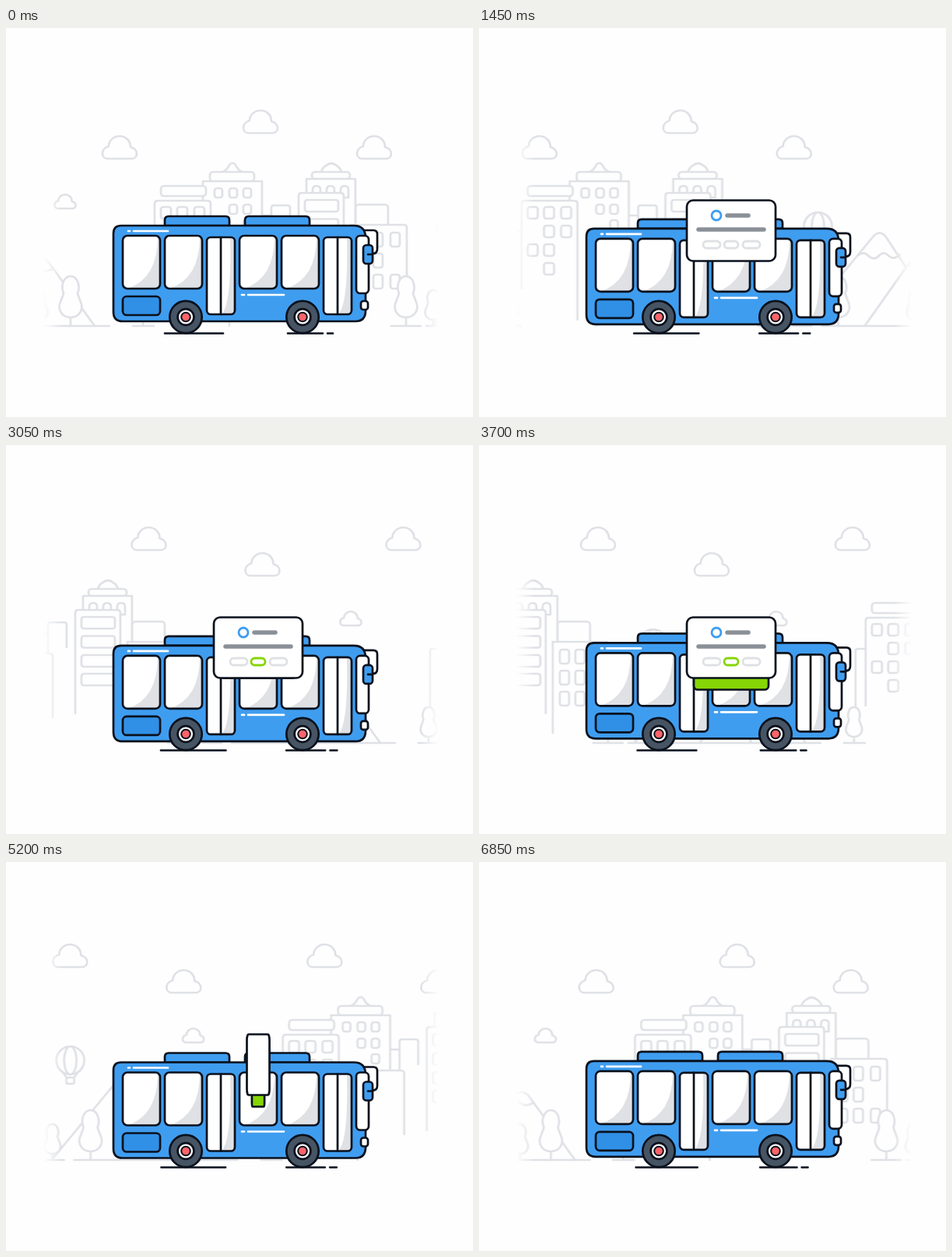
These frames come from a looping animation (600 by 500 pixels, 6900 ms). An HTML page:

```html
<!DOCTYPE html>
<html>
<head>
<meta charset="utf-8">
<style>
html, body { margin: 0; width: 100%; height: 100%; overflow: hidden; background: #fefefe; }
svg { display: block; width: 600px; height: 500px; stroke-linecap: round; stroke-linejoin: round; }
.far { fill: #fefefe; stroke: #dfe1e6; stroke-width: 2.7; }
.ink { stroke: #0a111c; stroke-width: 2.7; }
.ink rect, .ink path { vector-effect: non-scaling-stroke; }
</style>
</head>
<body>
<svg id="stage" viewBox="0 0 600 500"></svg>
<script>
const LOOP = 6900, SPAN = 654, SPEED = 0.0941, BOB = 534.6;
const BLUE = '#3f9df0', WHITE = '#fff', SHADE = '#dfe1e5', MID = 324;

const rect = (x, y, x2, y2, r = 4, fill, extra = '') =>
  `<rect x="${x}" y="${y}" width="${x2 - x}" height="${y2 - y}" rx="${r}" ${fill ? `fill="${fill}"` : ''} ${extra}/>`;
const path = (d, extra = '') => `<path d="${d}" ${extra}/>`;
const open = d => path(d, 'fill="none"');
const at = (x, y, s, body) => `<g transform="translate(${x} ${y}) scale(${s})">${body}</g>`;
const panes = (xs, y, w, h) => xs.map(x => rect(x, y, x + w, y + h, 3)).join('');
const thin = s => `vector-effect="non-scaling-stroke" data-s="${s}"`;

const cloud = (x, y, s = 1) => at(x, y, s, path(
  'M-15 29H15C24 29 25 17 14 14C14 5 7 0 0 0C-8 0 -14 6 -14 13C-25 16 -24 29 -15 29Z', thin(s)));
const tree = (x, s = 1) => at(x, 383, s, path(
  'M0 -11C-12 -11 -17 -22 -13 -31C-11 -36 -10 -38 -9 -42C-13 -51 -9 -64 0 -64C9 -64 13 -51 9 -42' +
  'C10 -38 11 -36 13 -31C17 -22 12 -11 0 -11V0', thin(s)));

const mountains =
  path('M548 383L643 268Q651 259 659 268L735 383', 'stroke-dasharray="500"') +
  open('M624 292Q631 286 637 293Q644 300 651 292Q657 286 663 293Q670 299 677 291') +
  path('M632 383L690 301Q699 291 708 300L768 383') +
  open('M684 309Q691 301 697 309Q704 316 715 309');

const balloon =
  '<ellipse cx="572" cy="255" rx="18" ry="18"/><ellipse cx="572" cy="255" rx="8" ry="18"/>' +
  open('M563 271L567 277M581 271L577 277') + rect(567, 277, 577, 285, 2);

const city =
  rect(449, 227, 491, 260) +
  open('M341 241H329M341 268V231Q341 228 344 228H362Q365 228 365 231V260') +
  // domed tower
  path('M278 185Q284 183 287 176Q291 171 295 176Q298 183 304 185') + rect(262, 185, 319, 197) +
  path('M253 345V197H329V270') +
  panes([268, 287, 305], 206, 10, 12) + panes([287, 305], 227, 10, 12) + panes([305], 247, 10, 12) +
  // low block with a sign
  open('M178 335V265Q178 262 181 262H191') +
  rect(199, 203, 257, 216) + path('M191 335V226Q191 222 195 222H259Q263 222 263 226V375') +
  panes([199, 220, 242], 230, 13, 15) + panes([220, 242], 254, 13, 15) +
  panes([199, 220], 278, 13, 15) + panes([220], 302, 13, 15) +
  path('M287 350V272Q287 268 291 268H343Q347 268 347 272V350') +
  // office block
  path('M443 253H511Q515 253 515 257V335') +
  panes([452, 472, 494], 263, 12, 18) + panes([452, 472], 290, 12, 18) + panes([452, 472, 494], 317, 12, 18) +
  // striped tower
  path('M405 185Q407 179 411 177Q418 171 425 177Q429 179 431 185') + rect(393, 185, 442, 194) +
  path('M386 212V194H449V253') + open('M443 253V370') +
  [394, 412, 430].map(x => path(`M${x} 218V208Q${x} 203 ${x + 5} 203T${x + 10} 208V218Z`)).join('') +
  path('M376 345V216Q376 212 380 212H430Q434 212 434 216V345') +
  [221, 245.5, 270, 294].map(y => rect(384, y, 427, y + 15, 3)).join('');

const land = mountains + city + balloon +
  tree(43, .72) + tree(83) + tree(176, .72) + tree(287, .72) + tree(514) + tree(549, .72) + tree(598) + tree(697, .72) +
  open('M43 383H133M163 383H190M495 383H533M540 383H564M577 383H697') + cloud(76, 214, .62);

const repeat = (body, step, from, to) => {
  let out = '';
  for (let i = from; i <= to; i++) out += `<g transform="translate(${i * step})">${body}</g>`;
  return out;
};

const glass = x => rect(x, 267, x + 48, 335, 6, WHITE, 'stroke="none"') +
  path(`M${x + 45} 268Q${x + 45} 322 ${x + 6} 335H${x + 42}Q${x + 48} 335 ${x + 48} 329V268Z`, `fill="${SHADE}" stroke="none"`) +
  rect(x, 267, x + 48, 335, 6, 'none');
const door = x => rect(x, 269, x + 36, 368, 5, WHITE, 'stroke="none"') +
  path(`M${x + 30} 270Q${x + 32} 350 ${x + 20} 367H${x + 31}Q${x + 36} 367 ${x + 36} 362V270Z`, `fill="${SHADE}" stroke="none"`) +
  rect(x, 269, x + 36, 368, 5, 'none') + open(`M${x + 18} 269V368`);
const roof = x => path(`M${x} 254V247Q${x} 242 ${x + 5} 242H${x + 78}Q${x + 83} 242 ${x + 83} 247V254Z`, `fill="${BLUE}"`);

const bus =
  path('M460 260H472Q477 260 477 265V284Q477 290 471 290H460Z', `fill="${WHITE}"`) +
  roof(204) + roof(307) +
  path('M148 254H447Q462 254 462 270V363Q462 377 449 377H150Q138 377 138 365V264Q138 254 148 254Z', `fill="${BLUE}"`) +
  [150, 204, 300, 354].map(glass).join('') + door(258) + door(408) +
  rect(150, 345, 198, 369, 5, '#3090e6') +
  path('M157 261H159M164 261H208M303 343H306M311 343H357', 'stroke="#fff" fill="none"') +
  rect(450, 267, 466, 341, 5, WHITE) +
  rect(459, 279, 471, 303, 4, BLUE) + open('M465 291H471') +
  rect(456, 351, 465, 362, 3, WHITE);

const wheel = x => `<circle cx="${x}" cy="371.5" r="20.7" fill="#465463"/>
  <circle cx="${x}" cy="371.5" r="10.4" fill="#fff"/><circle cx="${x}" cy="371.5" r="5.8" fill="#fb6469" stroke-width="2"/>`;

const pill = (x, x2, extra = '') => rect(x, 274, x2, 283, 4.5, 'none', extra);
const content =
  `<circle cx="305" cy="241" r="6" fill="none" stroke="${BLUE}" stroke-width="2.8"/>` +
  path('M319 241H346M282 259H366', 'stroke="#8b9098" stroke-width="5.5"') +
  `<g stroke="#dfe1e5" stroke-width="2.8">${pill(288, 310)}${pill(339, 361)}${pill(315, 333, 'id="choice"')}</g>`;

const stage = document.getElementById('stage');
stage.innerHTML = `
  <defs>
    <linearGradient id="fade">
      <stop offset="0" stop-color="#000"/><stop offset=".045" stop-color="#fff"/>
      <stop offset=".955" stop-color="#fff"/><stop offset="1" stop-color="#000"/>
    </linearGradient>
    <mask id="edges" maskUnits="userSpaceOnUse" x="0" y="0" width="600" height="500">
      <rect x="48" y="90" width="508" height="310" fill="url(#fade)"/>
    </mask>
  </defs>
  <g class="far" mask="url(#edges)">
    <g id="land">${repeat(land, SPAN, -1, 1)}</g>
    <g id="sky">${repeat(cloud(146, 139) + cloud(327, 106), SPAN / 2, -1, 2)}</g>
  </g>
  <g class="ink" fill="none">
    <path id="ground"/>
    <g id="bus">${bus}</g>
    ${wheel(231)}${wheel(381)}
    <g id="tab">${rect(276, 270, 372, 314.5, 5, '#86d505')}</g>
    <g id="card">${rect(267, 221.5, 381, 299.5, 8, WHITE)}</g>
  </g>
  <g id="content">${content}</g>`;

const el = {};
for (const id of ['land', 'sky', 'ground', 'bus', 'tab', 'card', 'content', 'choice']) el[id] = document.getElementById(id);

const ease = (t, start, length) => {
  const p = Math.min(1, Math.max(0, (t - start) / length));
  return p * p * (3 - 2 * p);
};
const move = (node, x, y) => node.setAttribute('transform', `translate(${x} ${y})`);
const squeeze = (node, s, y = 0) => {
  node.setAttribute('transform', `translate(${MID} ${y}) scale(${Math.max(s, .001)} 1) translate(${-MID})`);
  node.style.display = s > .01 ? '' : 'none';
};
const mix = (a, b, k) => a.map((v, i) => Math.round(v + (b[i] - v) * k));

function draw(t) {
  move(el.land, -t * SPEED, 0);
  move(el.sky, -t * SPEED / 2, 0);

  const k = (1 - Math.cos(2 * Math.PI * t / BOB)) / 2;
  move(el.bus, 0, 6.2 * k);
  el.ground.setAttribute('d', `M${204 - 8 * k} 392.5H${279 + 5.5 * k}M${362 - 3 * k} 392.5H${407 + 5 * k}` +
    `M${413 + 5.5 * k} 392.5H${420 + 8.5 * k}`);

  squeeze(el.card, ease(t, 700, 300) - ease(t, 5000, 300));
  const drop = ease(t, 3000, 300);
  squeeze(el.tab, drop > 0 ? 1 - ease(t, 5000, 272) : 0, -16 * (1 - drop));
  el.content.style.opacity = ease(t, 950, 250) - ease(t, 4900, 130);
  const blue = mix([223, 225, 229], [63, 157, 240], ease(t, 1850, 200));
  el.choice.setAttribute('stroke', `rgb(${mix(blue, [134, 213, 5], ease(t, 2850, 200))})`);
}

// Scaled shapes keep the same line weight as the rest.
const start = performance.now();
function tick(now) {
  draw(Math.max(0, now - start) % LOOP);
  requestAnimationFrame(tick);
}
draw(0);
requestAnimationFrame(tick);
</script>
</body>
</html>
```
